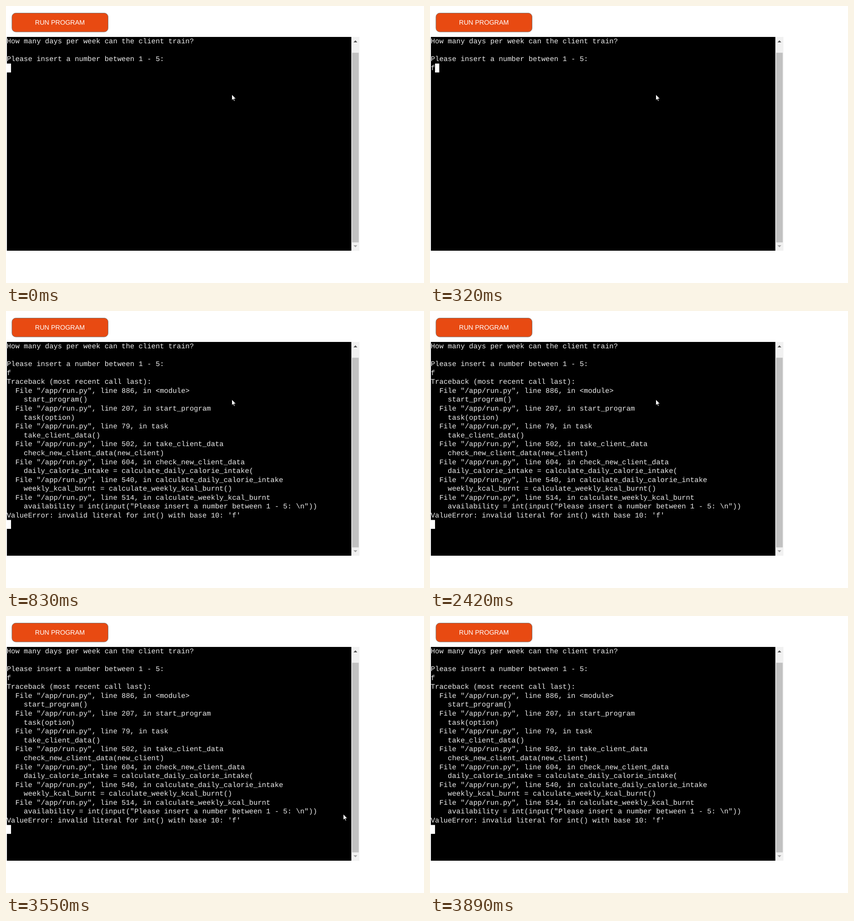
An HTML page for the animation above (4.21 s loop, 919 by 609 pixels).

```html
<!DOCTYPE html>
<html lang="en">
<head>
<meta charset="utf-8">
<title>Terminal run</title>
<style>
html, body { margin: 0; width: 100%; height: 100%; overflow: hidden; background: #fff; }
svg { display: block; }
text { text-rendering: geometricPrecision; }
#lines text { font: 15.58px "Liberation Mono", "Courier New", monospace; fill: #ececec; white-space: pre; }
#label { font: 14.4px "Liberation Sans", Arial, sans-serif; fill: #fff; text-anchor: middle; }
</style>
</head>
<body>
<svg width="919" height="609" viewBox="0 0 919 609">
  <rect x="13" y="15.5" width="211.5" height="41.5" rx="8.5" fill="#e84a12" stroke="#7d7571"/>
  <text id="label" x="118.6" y="41">RUN PROGRAM</text>

  <rect x="2" y="68" width="757.5" height="470"/>
  <rect x="759.5" y="68" width="17.5" height="470" fill="#f1f1f1"/>
  <rect x="761" y="102.7" width="14.5" height="417" fill="#c1c1c1"/>
  <path d="M764 80L768.2 75.6L772.4 80z" fill="#505050"/>
  <path d="M764 526L768.2 530.4L772.4 526z" fill="#a3a3a3"/>

  <g id="lines"></g>
  <rect id="block" width="9.35" height="19.58" fill="#fff"/>
  <path id="mouse" d="M.5 .5V13.4L3.4 10.7L5.4 15.3L7.3 14.5L5.4 10.1H9.5z"
        fill="#fff" stroke="#000" stroke-width=".9"/>
</svg>
<script>
const LOOP = 4210, LEFT = 1.7, TOP = 68, COL = 9.35, ROW = 19.58;
const $ = id => document.getElementById(id);

const call = (line, name, code) => [`  File "/app/run.py", line ${line}, in ${name}`, `    ${code}`];
const output = [
  'How many days per week can the client train?',
  '',
  'Please insert a number between 1 - 5:',
  'f',
  'Traceback (most recent call last):',
  ...call(886, '<module>', 'start_program()'),
  ...call(207, 'start_program', 'task(option)'),
  ...call(79, 'task', 'take_client_data()'),
  ...call(502, 'take_client_data', 'check_new_client_data(new_client)'),
  ...call(604, 'check_new_client_data', 'daily_calorie_intake = calculate_daily_calorie_intake('),
  ...call(540, 'calculate_daily_calorie_intake', 'weekly_kcal_burnt = calculate_weekly_kcal_burnt()'),
  ...call(514, 'calculate_weekly_kcal_burnt',
    'availability = int(input("Please insert a number between 1 - 5: \\n"))'),
  "ValueError: invalid literal for int() with base 10: 'f'"
];

const rows = output.map((line, i) => {
  const el = document.createElementNS('http://www.w3.org/2000/svg', 'text');
  el.setAttribute('x', LEFT);
  el.setAttribute('y', TOP + i * ROW + 14);
  el.textContent = line;
  return $('lines').appendChild(el);
});

// Each step: start time, then its values
const typing = [[0, 3, 3, 0], [320, 4, 3, 1], [830, output.length, output.length, 0]];
const pointer = [[0, 496, 194], [3480, 653, 329], [3550, 741, 435], [3630, 813, 531], [3890, -50, -50]];
const at = (steps, t) => steps.filter(s => s[0] <= t).pop();
const move = (el, x, y) => el.setAttribute('transform', `translate(${x} ${y})`);

function draw(now) {
  const t = Math.max(0, now - start) % LOOP;
  const [, shown, row, col] = at(typing, t);
  const [, x, y] = at(pointer, t);
  rows.forEach((el, i) => el.setAttribute('visibility', i < shown ? 'visible' : 'hidden'));
  move($('block'), LEFT + col * COL, TOP + row * ROW - .2);
  move($('mouse'), x, y);
  requestAnimationFrame(draw);
}
const start = performance.now();
draw(start);
</script>
</body>
</html>
```
